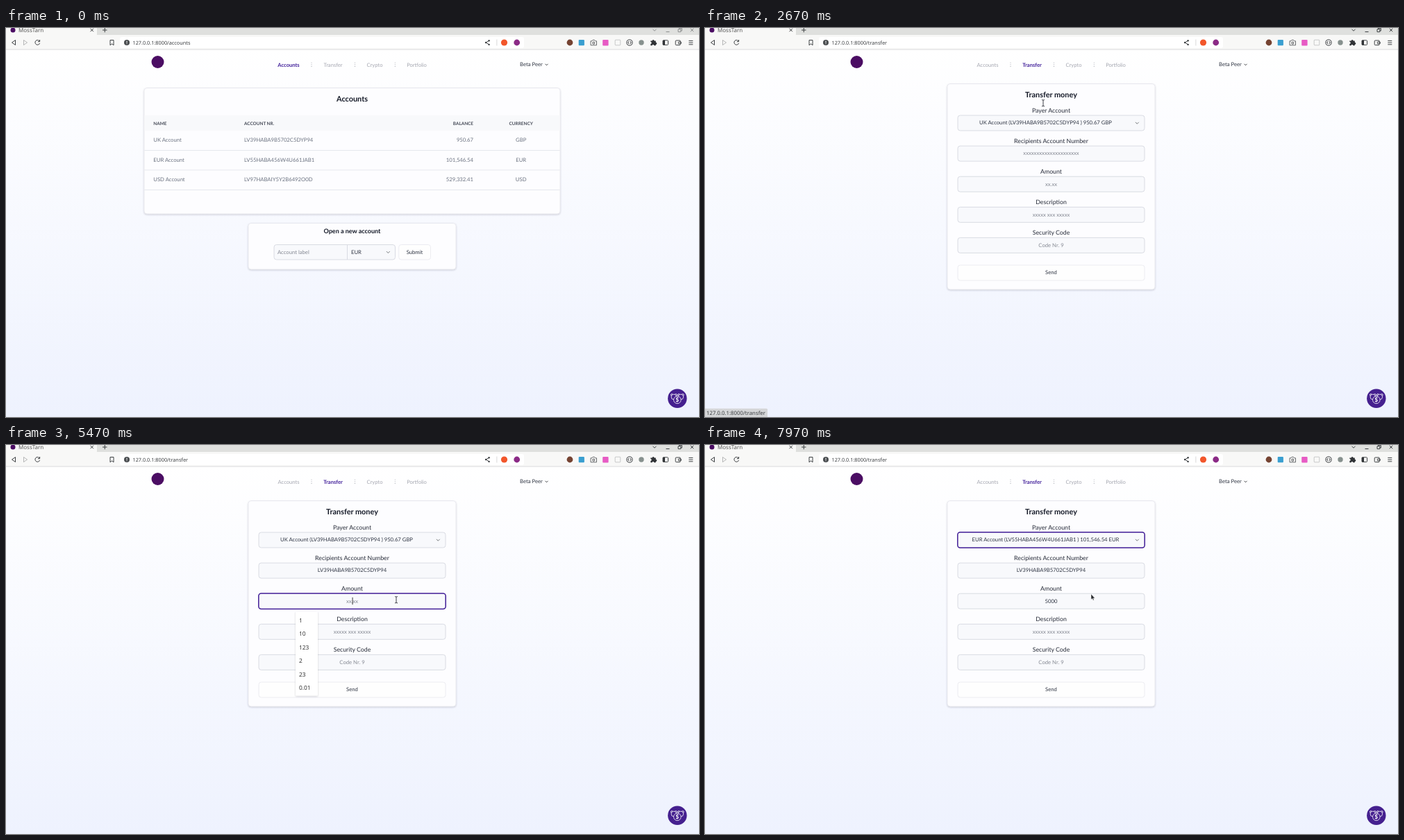
Write an HTML page that moves like this. It is 998 by 561 pixels and loops after 8000 ms.

```html
<!DOCTYPE html>
<html lang="en">
<head>
<meta charset="utf-8">
<title>Banking demo</title>
<style>
html, body { margin: 0; width: 100%; height: 100%; overflow: hidden; background: #fff; }
svg { display: block; width: 100%; height: 100%; }
text { font: 7.7px Lato, "Open Sans", sans-serif; fill: #6b7280; text-rendering: geometricPrecision; white-space: pre; }
.dark { fill: #2f3543; }
.hint { fill: #858993; }
.nav { font-size: 7.6px; fill: #a4a6b0; }
.on { font-weight: 700; fill: #42209a; }
.title { font-size: 10.9px; font-weight: 700; fill: #151a28; }
.sub { font-size: 9px; font-weight: 700; fill: #151a28; }
.label { font-size: 8.75px; fill: #262b38; }
.th { font-size: 6.4px; font-weight: 700; fill: #454a57; }
.ui { font: 7.3px "Noto Sans", sans-serif; fill: #3c3f42; }
.tab { font-size: 8px; fill: #555; }
.status { font-size: 7.8px; }
.item { font-size: 8.4px; fill: #333; }
.tip { font-size: 7.5px; fill: #333; }
.line { fill: none; stroke: #3d4043; stroke-width: 1; }
.field { fill: #f8f9fc; stroke: #d1d4dc; stroke-width: .8; }
.button { fill: #fefefe; stroke: #e7e8ee; stroke-width: .8; }
.card { fill: #fdfdff; stroke: #e2e3ea; stroke-width: .7; filter: url(#shadow); }
.pop { fill: #fff; filter: url(#shadow); }
.focus { fill: none; stroke: #45219a; stroke-width: 1.5; }
</style>
</head>
<body>
<svg id="stage" viewBox="0 0 998 561" preserveAspectRatio="none"></svg>
<script>
const LOOP = 8000;
const UK = 'LV39HABA9B5702C5DYP94';
const EUR = 'LV55HABA456W4U661JAB1';
const USD = 'LV97HABAIY5Y2B6492O0D';
const options = [
  `UK Account (${UK} ) 950.67 GBP`,
  `EUR Account (${EUR} ) 101,546.54 EUR`,
  `USD Account (${USD} ) 529,332.41 USD`
];

const text = (x, y, value, cls = '', anchor = 'start', id = '') =>
  `<text x="${x}" y="${y}" class="${cls}" text-anchor="${anchor}" id="${id}">${value}</text>`;
const mid = (x, y, value, cls, id) => text(x, y, value, cls, 'middle', id);
const box = (x, y, w, h, cls = '', r = 0, more = '') =>
  `<rect x="${x}" y="${y}" width="${w}" height="${h}" rx="${r}" class="${cls}" ${more}/>`;
const dot = (x, y, r, fill, more = '') => `<circle cx="${x}" cy="${y}" r="${r}" fill="${fill}" ${more}/>`;
const line = (d, more = '') => `<path class="line" d="${d}" ${more}/>`;
const group = (id, body, more = '') => `<g id="${id}" ${more}>${body}</g>`;
const chevron = (x, y, s, more) => line(`M${x - s} ${y - s / 2}l${s} ${s}l${s} ${-s}`, more);

const browser = () =>
  box(0, 0, 998, 11, '', 0, 'fill="#dfe0de"') +
  box(0, -4, 131, 16, '', 3, 'fill="#f8f8f7"') +
  box(0, 10, 998, 21, '', 0, 'fill="#f8f8f7"') +
  box(0, 30.6, 998, .8, '', 0, 'fill="#d2d3d4"') +
  box(164, 13, 582, 16, '', 3, 'fill="#fff"') +
  dot(10, 3, 3.5, '#4b0d63') + text(18, 5.8, 'MossTarn', 'ui tab') +
  line('M121.5 .8l4.4 4.4m0-4.4l-4.4 4.4M139 3h6.5m-3.25-3.25v6.5') +
  group('windowButtons', chevron(934, 3, 2.5) +
    line('M950.5 5.5h5M968 1.8h3.8v3.8h-3.8zM969.5 1.8v-1.5h3.8v3.8h-1.5M985.8 .8l4.4 4.4m0-4.4l-4.4 4.4')) +
  line('M13.5 17.5v7l-5-3.5z') + line('M25.5 17.5v7l5-3.5z', 'opacity=".35"') +
  line('M48 18.7a3.4 3.4 0 1 0 .6 3.2M48.6 17v2.7h-2.7') +
  line('M150 17.5h5v7.3l-2.5-2-2.5 2z') +
  dot(174, 21, 4, '#4a4d50') + box(173.5, 18.6, 1, 2.9, '', 0, 'fill="#fff"') + box(173.5, 22.3, 1, 1, '', 0, 'fill="#fff"') +
  text(182.5, 23.8, '', 'ui', 'start', 'address') +
  line('M695.5 18.3l-4.3 2.7 4.3 2.8', 'stroke-width=".8"') +
  [[695.6, 18.2], [691, 21], [695.6, 23.9]].map(([x, y]) => dot(x, y, 1.2, '#3d4043')).join('') +
  box(706.5, 16.5, .8, 9, '', 0, 'fill="#cfcfcf"') +
  dot(717.5, 21, 4.6, '#f2562b') + dot(735.7, 21, 4.4, '#8b2a86') +
  dot(812, 21, 4.4, '#754332') + box(824.7, 17, 8.2, 8.2, '', 1, 'fill="#3a9fd0"') +
  line('M842 18.8h2l1-1.5h2.5l1 1.5h2v6h-8.5z', 'opacity=".75"') + dot(846.3, 21.6, 1.5, 'none', 'class="line"') +
  box(859.2, 17, 8.4, 8.4, '', 1, 'fill="#e75bc4"') +
  box(877.2, 17.2, 7.6, 7.6, 'line', 1, 'opacity=".25"') +
  dot(898, 21, 4.1, 'none', 'class="line"') + line('M897 19l-1.2 2 1.2 2m2-4l1.2 2-1.2 2', 'stroke-width=".7"') +
  dot(915, 21, 3.7, '#87918e') +
  '<path fill="#303336" d="M928.3 18.5h2.3a1.5 1.5 0 0 1 3 0h2.2v2.3a1.5 1.5 0 0 1 0 3v1.5h-2.6a1.3 1.3 0 0 0-2.6 0h-2.3v-2.4a1.4 1.4 0 0 0 0-2.8z"/>' +
  box(946, 17.8, 7.5, 6.6, 'line', .8) + box(946, 17.8, 3, 6.6, '', 0, 'fill="#303336"') +
  box(964.2, 18, 7, 6.6, 'line', 1) + box(968.3, 20, 4, 2.7, 'line', .6) +
  line('M983.3 18.4h6m-6 2.7h6m-6 2.7h6');

const links = [[407, 'Accounts'], [471, 'Transfer'], [531, 'Crypto'], [591.5, 'Portfolio']];
const siteHeader = () =>
  dot(218.5, 49, 9, '#4b0d63') +
  links.map(([x, name]) => mid(x, 55.6, name, 'nav', 'nav' + name)).join('') +
  [440, 502.5, 560.3].map(x => [50, 52.7, 55.4].map(y => dot(x, y, .55, '#a7a9b2')).join('')).join('') +
  text(740, 55.2, 'Beta Peer', 'dark') + chevron(778.5, 52.8, 2, 'stroke-width="1.2"');

const rows = [
  ['UK Account', UK, '950.67', 'GBP'],
  ['EUR Account', EUR, '101,546.54', 'EUR'],
  ['USD Account', USD, '529,332.41', 'USD']
];
const tableRow = ([name, number, balance, currency], y, cls) =>
  text(212.3, y, name, cls) + text(343, y, number, cls) +
  text(673, y, balance, cls, 'end') + mid(741.7, y, currency, cls);

const accountsPage = () =>
  box(199, 86.5, 599, 181.5, 'card', 4) + mid(498.5, 106, 'Accounts', 'title') +
  box(199.4, 126, 598.2, 22, '', 0, 'fill="#f8f9fb"') +
  box(199.4, 148, 598.2, 28.5, '', 0, 'id="rowHover" fill="#f7f8fa"') +
  tableRow(['NAME', 'ACCOUNT NR.', 'BALANCE', 'CURRENCY'], 139.5, 'th') +
  rows.map((row, i) => tableRow(row, 164.2 + i * 28.5) +
    box(199.4, 176 + i * 28.5, 598.2, .8, '', 0, 'fill="#e2e4e9"')).join('') +
  box(349, 281.5, 299, 66.5, 'card', 4) + mid(498.5, 295.7, 'Open a new account', 'sub') +
  '<path class="field" d="M491.5 312.5h-102a3.5 3.5 0 0 0-3.5 3.5v14.5a3.5 3.5 0 0 0 3.5 3.5h102zh65.500a3.5 3.5 0 0 1 3.5 3.5v14.5a3.5 3.5 0 0 1-3.5 3.5h-65.500"/>' +
  text(391, 325.8, 'Account label', 'hint') + text(497, 325.8, 'EUR', 'dark') + chevron(550.3, 323.3, 2.4, 'opacity=".7"') +
  box(565.7, 312.5, 45.8, 21.5, 'button', 3.5) + mid(588.5, 325.8, 'Submit', 'dark');

const fieldNames = ['Payer Account', 'Recipients Account Number', 'Amount', 'Description', 'Security Code'];
const fieldIds = ['payer', 'recipient', 'amount', 'description', 'code'];
const fieldTop = i => 126 + i * 44.1;
const transferPage = () =>
  box(349, 80.5, 299, 296.5, 'card', 4) + mid(498.5, 99.9, 'Transfer money', 'title') +
  fieldNames.map((name, i) => mid(498.5, fieldTop(i) - 4.2, name, 'label') +
    box(364, fieldTop(i), 269, 22, 'field', 3.5) +
    mid(i ? 498.5 : 490.5, fieldTop(i) + 13.3, '', 'hint', fieldIds[i])).join('') +
  chevron(622.3, 137, 2.4, 'opacity=".7"') +
  box(364, 342, 269, 22, 'button', 3.5) + mid(498.5, 355.2, 'Send', 'dark') +
  box(363.8, 0, 269.4, 22.6, 'focus', 3.8, 'id="focus"') +
  group('spelling', `<path fill="none" stroke="#e33b3b" stroke-width=".8" d="M448.5 185${'l1.25-1l1.25 1'.repeat(40)}"/>`) +
  box(0, 219.8, .9, 10.4, '', 0, 'id="caret" fill="#222"') +
  group('suggestions', box(417, 240.5, 32, 121, 'pop', 1, 'id="suggestBox"') +
    Array.from({length: 6}, (_, i) => text(422, 256 + i * 19.4, '', 'ui item', 'start', 'item' + i)).join('')) +
  group('options', box(364, 149, 269, 45, 'pop', 1) +
    box(364, 150, 269, 14.5, '', 0, 'id="optionHover" fill="#d6d6da"') +
    options.map((name, i) => mid(498.5, 160 + i * 14.5, name, 'dark')).join('')) +
  group('tooltip', box(568, 231.5, 93.5, 13, '', 0, 'fill="#fbfbfb" stroke="#666" stroke-width=".9"') +
    text(571.7, 240.5, 'Please fill out this field.', 'ui tip'));

const bearHead = (x, y, r) =>
  [-1, 1].map(side => dot(x + side * r * .75, y - r * .75, r * .4, '#45208f', 'stroke="#fff" stroke-width=".8"')).join('') +
  dot(x, y, r, '#45208f', 'stroke="#fff" stroke-width=".8"');
const helpButton = () => dot(966.8, 534.3, 13.7, '#45208f') +
  bearHead(961.8, 532, 3.8) + bearHead(971.8, 532, 3.8) + dot(966.8, 536.3, 5.3, '#45208f', 'stroke="#fff" stroke-width=".8"') +
  '<text x="966.8" y="539.4" text-anchor="middle" style="font-size:8.5px;font-weight:700;fill:#fff">$</text>';

const cursors = {
  beam: '<path d="M-2-4.5q2 0 2 1.200v7q0 1.200-2 1.200M2-4.5q-2 0-2 1.200M2 4.900q-2 0-2-1.200" fill="none" stroke="#50525a" stroke-width="1.100"/>',
  arrow: '<path transform="scale(.88)" d="M0 0v9l2-1.800 1.400 3.100 1.400-.6-1.300-3h2.700z" fill="#26282c" stroke="#fff" stroke-width=".5"/>',
  hand: '<path transform="scale(.9)" d="M-1 0q1-1 2 0v4q3 0 4.500 1.500v3l-1 2.500h-5l-3-4q.3-1.300 1.500-.5l1 1z" fill="#fff" stroke="#26282c" stroke-width=".9"/>'
};

const stage = document.getElementById('stage');
stage.innerHTML = `<defs>
  <linearGradient id="page" x2="0" y2="1"><stop stop-color="#fff"/><stop offset="1" stop-color="#eef2fe"/></linearGradient>
  <filter id="shadow" x="-10%" y="-10%" width="120%" height="125%"><feDropShadow dx="0" dy="1" stdDeviation="1.1" flood-color="#30324a" flood-opacity=".24"/></filter>
  </defs>` +
  box(0, 31, 998, 530, '', 0, 'fill="url(#page)"') + browser() + siteHeader() +
  group('accountsPage', accountsPage()) + group('transferPage', transferPage()) + helpButton() +
  group('status', box(-2, 548.7, 92, 14, '', 1.5, 'fill="#d5d6d8"') + text(2, 557.6, '127.0.0.1:8000/transfer', 'ui status')) +
  group('cursor', Object.entries(cursors).map(([name, body]) => group(name, body)).join(''));

const el = id => document.getElementById(id);
const show = (id, on) => { el(id).style.display = on ? '' : 'none'; };
const put = (id, value) => { if (el(id).textContent !== value) el(id).textContent = value; };
const set = (id, attrs) => { for (const k in attrs) el(id).setAttribute(k, attrs[k]); };
const at = (steps, t) => steps.findLast(step => step[0] <= t);

// time, x, y, cursor shape from then on
const path = [
  [0, -20, 420, 'arrow'], [420, -20, 420, 'arrow'], [760, 396, 163, 'beam'], [880, 401, 159, 'beam'],
  [1250, 401, 159, 'beam'], [1480, 440, 98, 'arrow'], [1720, 470, 54, 'hand'], [2460, 471, 56, 'hand'],
  [2580, 479, 80, 'beam'], [2670, 487, 108, 'beam'], [3000, 532, 181, 'beam'], [3420, 532, 181, 'beam'],
  [3600, 562, 223, 'beam'], [5950, 562, 223, 'beam'], [6080, 564, 199, 'arrow'], [6300, 565, 158, 'arrow'],
  [6740, 565, 158, 'arrow'], [6940, 560, 139, 'arrow'], [7160, 559, 140, 'arrow'], [7340, 557, 170, 'arrow'],
  [7560, 557, 171, 'arrow'], [7820, 556, 215, 'arrow'], [LOOP, 556, 215, 'arrow']
];
const focusSteps = [[0, -1], [3080, 1], [4600, 2], [6990, 0]];
const amountSteps = [[0, ''], [5800, '5'], [6020, '50'], [6240, '500'], [6720, '5000']];
const history = ['1', '10', '123', '2', '23', '0.01'];
const fives = ['500', '5000', '50000.55', '50000'];

function pointer(t) {
  const i = path.findLastIndex(p => p[0] <= t);
  const a = path[i], b = path[i + 1];
  const u = (t - a[0]) / (b[0] - a[0]);
  const k = u * u * (3 - 2 * u);
  return {x: a[1] + (b[1] - a[1]) * k, y: a[2] + (b[2] - a[2]) * k, shape: a[3]};
}

function setField(id, value, hint) {
  put(id, value || hint);
  el(id).setAttribute('class', value ? 'dark' : 'hint');
}

function draw(t) {
  const transfer = t >= 2300;
  const p = pointer(t);
  put('address', '127.0.0.1:8000/' + (transfer ? 'transfer' : 'accounts'));
  set('windowButtons', {opacity: t < 880 ? .5 : 1});
  show('accountsPage', !transfer);
  show('transferPage', transfer);
  set('navAccounts', {class: transfer ? 'nav' : 'nav on'});
  set('navTransfer', {class: transfer ? 'nav on' : 'nav'});
  show('status', t >= 1760 && t < 2850);

  const row = Math.floor((p.y - 148) / 28.5);
  show('rowHover', p.x > 199 && row >= 0 && row < 3);
  set('rowHover', {y: 148 + row * 28.5});

  const focus = at(focusSteps, t)[1];
  const amount = at(amountSteps, t)[1];
  setField('payer', options[t < 7550 ? 0 : 1]);
  setField('recipient', t < 3350 ? '' : UK, 'x'.repeat(21));
  setField('amount', amount, 'xx.xx');
  setField('description', '', 'xxxxx xxx xxxxx');
  setField('code', '', 'Code Nr. 9');
  show('focus', focus >= 0);
  set('focus', {y: fieldTop(focus) - .3});
  show('spelling', focus === 1 && t >= 3350);
  show('tooltip', t >= 4000 && t < 4600);

  const typed = amount.length;
  show('caret', focus === 2 && (typed > 0 || (t - 4600) % 1000 < 500 || t > 5200));
  set('caret', {x: typed ? 498.5 + typed * 2.25 : 498.6});
  const list = typed ? fives.filter(v => v.startsWith(amount)) : history;
  show('suggestions', focus === 2 && t >= 5100);
  history.forEach((_, i) => put('item' + i, list[i] || ''));
  set('suggestBox', {width: typed ? 51 : 32, height: 4.6 + list.length * 19.4});

  show('options', t >= 6990 && t < 7550);
  set('optionHover', {y: p.y > 163 ? 164.500 : 150});

  set('cursor', {transform: `translate(${p.x.toFixed(2)} ${p.y.toFixed(2)})`});
  for (const name in cursors) show(name, name === p.shape);
}

const start = performance.now();
function tick() {
  draw((performance.now() - start) % LOOP);
  requestAnimationFrame(tick);
}
tick();
</script>
</body>
</html>
```
